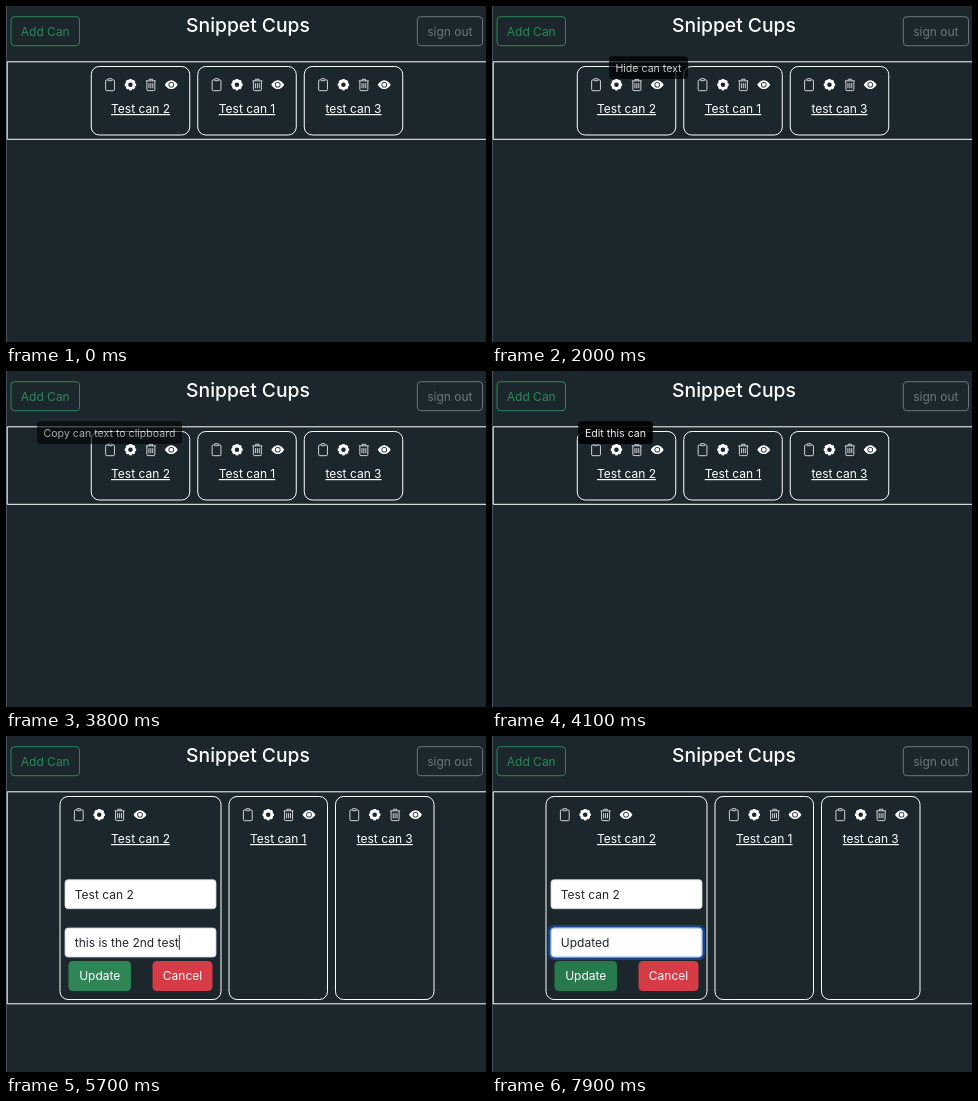
These frames come from a looping animation (480 by 337 pixels, 8 s). An HTML page:

```html
<!DOCTYPE html>
<html lang="en">
<head>
<meta charset="utf-8">
<title>Snippet Cups</title>
<style>
  html, body { margin: 0; width: 100%; height: 100%; overflow: hidden; background: #1c262d; }
  svg { display: block; width: 480px; height: 337px; font: 12px Inter, "Open Sans", sans-serif; }
  .line { fill: none; stroke: #fff; }
  .title { text-decoration: underline; text-underline-offset: 1.5px; }
</style>
</head>
<body>
<svg id="stage" viewBox="0 0 480 337"></svg>
<script>
const LOOP = 8000, STEP = 100;
const stage = document.getElementById('stage');
const pen = document.createElement('canvas').getContext('2d');
pen.font = '12px Inter, "Open Sans", sans-serif';

// Each table holds [start ms, value]; a value lasts until the next start.
const layout = [[0, 'closed'], [700, 'open'], [2000, 'closed'], [4700, 'edit']];
const hideTip = [[0, 0], [1700, .1], [1800, .6], [1900, .9], [2000, .72], [2100, .2], [2200, 0]];
const copyTip = [[0, 0], [2800, .12], [2900, .65], [3000, .9], [3800, .6], [3900, .15], [4000, 0]];
const editTip = [[0, 0], [3900, .15], [4000, .65], [4100, .9], [4800, .65], [4900, .2], [5000, 0]];
const ring = [[0, 0], [5700, .08], [5800, .6], [5900, 1]];
const caret = [[0, 0], [5600, 1], [6200, 0], [6500, 0], [6600, 1], [7700, 0]];
const selected = [[0, 0], [6500, 1], [6600, 0]];
const hover = [[0, 0], [7700, .3], [7800, .8], [7900, 1]];

const OLD_TEXT = 'this is the 2nd test', NEW_TEXT = 'Updated';
const sizes = {
  closed: { width: 98.5, height: 68.5 },
  open: { width: 114, height: 87.5 },
  edit: { width: 161, height: 203 }
};

const at = (table, t) => table.filter(([start]) => start <= t).pop()[1];

const text = (x, y, value, attrs = '') =>
  `<text x="${x}" y="${y}" fill="#fff" ${attrs}>${value}</text>`;

const box = (x, y, w, h, attrs) =>
  `<rect x="${x}" y="${y}" width="${w}" height="${h}" ${attrs}/>`;

const middle = 'text-anchor="middle"';

function button(x, y, w, label, fill, stroke, color) {
  return box(x, y, w, 29, `rx="3.5" fill="${fill}" stroke="${stroke}"`) +
    `<text x="${x + w / 2}" y="${y + 18.8}" fill="${color}" ${middle}>${label}</text>`;
}

const teeth = Array.from({ length: 8 }, (_, i) =>
  `<path d="M8 4V.9" stroke-width="3.2" transform="rotate(${i * 45} 8 8)"/>`).join('');

const icons = {
  clipboard: `<g class="line"><path d="M5 2H4A1.5 1.5 0 0 0 2.5 3.5V14A1.5 1.5 0 0 0 4 15.5H12A1.5 1.5 0 0 0 13.5 14V3.5A1.5 1.5 0 0 0 12 2H11"/>
    <rect x="5.5" y=".5" width="5" height="2.5" rx=".6"/></g>`,
  gear: `<g class="line"><circle cx="8" cy="8" r="4.6" stroke-width="3.5"/>${teeth}</g>`,
  trash: `<path class="line" d="M1.7 3.2H14.3M5.8 3V1.2H10.2V3M3 3.5V14Q3 15.4 4.4 15.4H11.6Q13 15.4 13 14V3.5M5.6 6V12.5M8 6V12.5M10.4 6V12.5"/>`,
  eye: `<path fill="#fff" fill-rule="evenodd" d="M0 8S3 2.5 8 2.5 16 8 16 8 13 13.5 8 13.5 0 8 0 8ZM8 11.5A3.5 3.5 0 1 0 8 4.5 3.5 3.5 0 0 0 8 11.5Z"/>
    <circle cx="8" cy="8" r="2.5" fill="#fff"/>`
};
icons.slashedEye = icons.eye +
  '<path d="M2.8 1.2L14.8 13.2" stroke="#1c262d" stroke-width="1.6"/><path class="line" d="M2 2L14 14" stroke-width="1.2"/>';

function card(x, width, height, name, eye) {
  const row = ['clipboard', 'gear', 'trash', eye].map((key, i) =>
    `<g transform="translate(${x + 12.4 + i * 20.4} 72.3) scale(.8)">${icons[key]}</g>`).join('');
  return box(x, 60.5, width, height, 'class="line" rx="8"') + row +
    text(x + width / 2, 107, name, `class="title" ${middle}`);
}

function tip(center, width, label, opacity) {
  if (!opacity) return '';
  return `<g opacity="${opacity}">` + box(center - width / 2, 50.3, width, 22.7, 'rx="3.2" fill="#000"') +
    text(center, 65.6, label, `${middle} font-size="10.6"`) + '</g>';
}

function field(y, value) {
  return box(59, y, 151, 29, 'rx="3" fill="#fff" stroke="#ced4da" stroke-width=".8"') +
    `<text x="68.8" y="${y + 18.8}" fill="#212529">${value}</text>`;
}

function form(t) {
  const typed = Math.max(0, Math.floor((t - 6600) / STEP));
  const value = t < 6600 ? OLD_TEXT : NEW_TEXT.slice(0, typed);
  const end = 68.8 + pen.measureText(value).width;
  const glow = at(ring, t);
  const mix = (from, to) => Math.round(from + (to - from) * at(hover, t));
  const green = `rgb(${mix(46, 39)},${mix(134, 122)},${mix(87, 76)})`;
  let out = field(143.7, 'Test can 2');
  out += box(57.5, 190.5, 154, 32, `rx="4.5" fill="none" stroke="#1a4284" stroke-width="3" opacity="${glow}"`);
  out += field(192, value);
  out += box(59, 192, 151, 29, `rx="3" fill="none" stroke="#86b7fe" stroke-width=".8" opacity="${glow}"`);
  if (at(selected, t)) out += box(68.8, 199, end - 68.8, 15, 'fill="#3f8cff" opacity=".4"');
  if (at(caret, t)) out += box(end + .2, 199, .9, 15, 'fill="#212529"');
  return out + button(63, 225.5, 61.5, 'Update', green, green, '#fff') +
    button(147, 225.5, 59, 'Cancel', '#d53c45', '#d53c45', '#fff');
}

function draw(t) {
  const mode = at(layout, t), { width, height } = sizes[mode], small = sizes.closed.width;
  const first = 241 - (width + 2 * small + 16) / 2;
  const second = first + width + 8, third = second + small + 8;
  const bottom = 60.5 + height + 4.3;
  let out = box(0, 0, 1, 337, 'fill="#48525a"') + box(0, 336, 480, 1, 'fill="#000"');
  out += text(242, 26.3, 'Snippet Cups', `${middle} font-size="19.3" font-weight="500"`);
  out += button(5, 10.7, 68.5, 'Add Can', 'none', '#2b8857', '#2b8857');
  out += button(411.3, 10.7, 65.2, 'sign out', 'none', '#6c757d', '#6c757d');
  out += `<path class="line" d="M480 55.8H1.2V${bottom}H480"/>`;
  out += card(first, width, height, 'Test can 2', mode === 'open' ? 'slashedEye' : 'eye');
  out += card(second, small, height, 'Test can 1', 'eye');
  out += card(third, small, height, 'test can 3', 'eye');
  if (mode === 'open') out += text(134, 138.2, OLD_TEXT, middle);
  if (mode === 'edit') out += form(t);
  out += tip(156.5, 79, 'Hide can text', at(hideTip, t));
  out += tip(103.5, 145, 'Copy can text to clipboard', at(copyTip, t));
  out += tip(123.5, 74.5, 'Edit this can', at(editTip, t));
  stage.innerHTML = out;
}

const origin = performance.now();
let shown = -1;
function tick() {
  const t = Math.floor((performance.now() - origin) % LOOP / STEP) * STEP;
  if (t !== shown) draw(shown = t);
  requestAnimationFrame(tick);
}
tick();
</script>
</body>
</html>
```
